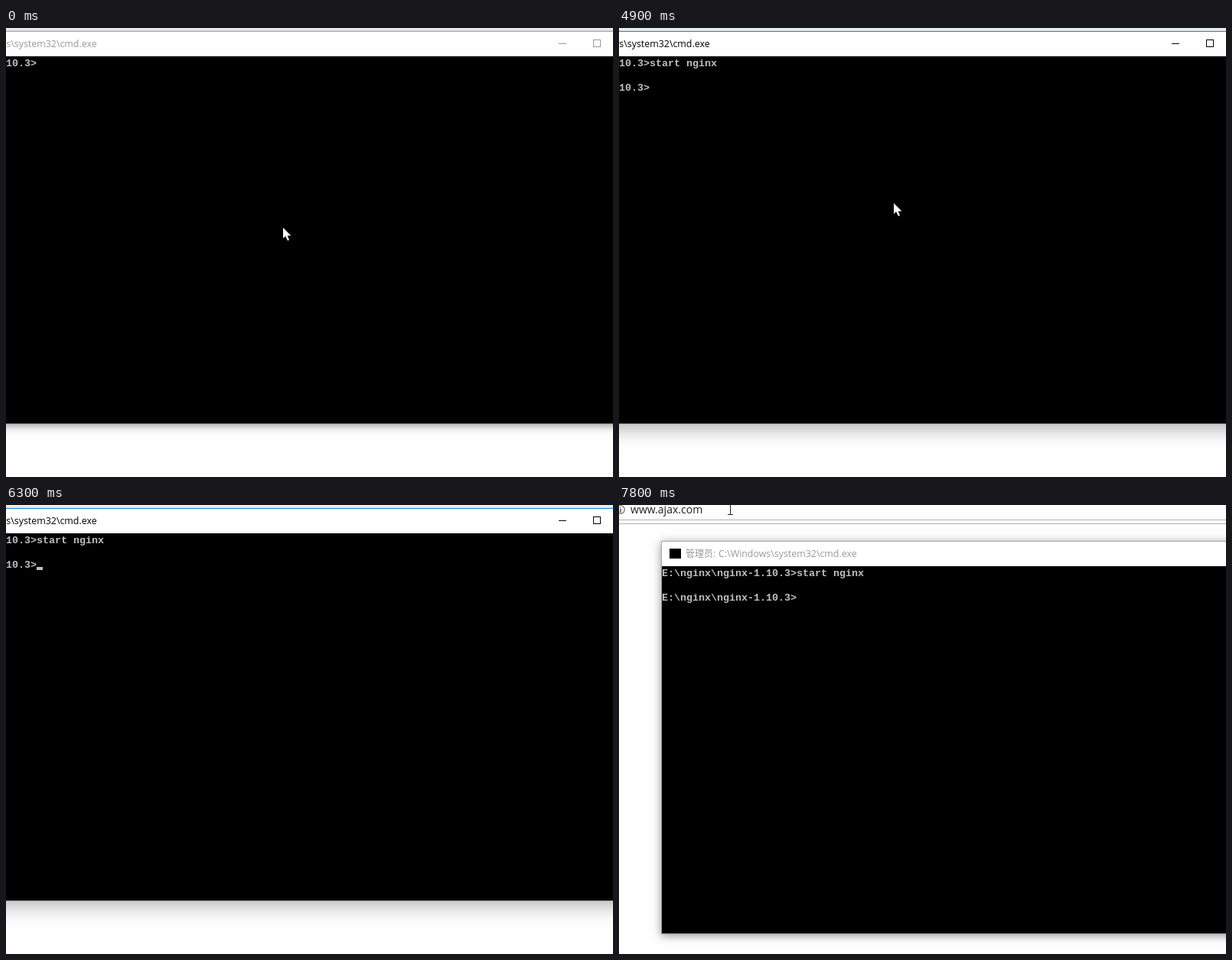
An HTML page with a canvas for the animation above (8 s loop, 793 by 587 pixels).

```html
<!DOCTYPE html>
<html lang="en">
<head>
<meta charset="utf-8">
<style>
html, body { margin: 0; width: 100%; height: 100%; overflow: hidden; background: #fefefe; }
canvas { display: block; }
</style>
</head>
<body>
<canvas id="stage" width="793" height="587"></canvas>
<script>
const ctx = document.getElementById('stage').getContext('2d');
const LOOP = 8000, STEP = 100;
const PROMPT = 'E:\\nginx\\nginx-1.10.3>', COMMAND = 'start nginx', CELL = 8;
const PAN = { x: 192, y: 43 };
const BLUE = '#1883d7', GRAY = '#c0c0c0';
// Moments of the story, in ms
const FOCUS = 100, TYPE = 1500, WORD2 = 4000, ENTER = 4900, LOADING = 5000, CHILD = 5100,
      BACK = 5400, LEAVE = 5800, BLUR = 6700, DRAG = 6900, PANNED = 7700;

const clamp = (v, lo, hi) => Math.min(hi, Math.max(lo, v));

function rect(color, x, y, w, h) {
  ctx.fillStyle = color;
  ctx.fillRect(x, y, w, h);
}

function text(str, x, y, color, font) {
  ctx.font = font;
  ctx.fillStyle = color;
  ctx.fillText(str, x, y);
}

function ring(x, y, r, width, color) {
  ctx.strokeStyle = color;
  ctx.lineWidth = width;
  ctx.beginPath();
  ctx.arc(x, y, r, 0, 7);
  ctx.stroke();
}

function shadowBox(color, x, y, w, h, active) {
  ctx.save();
  ctx.shadowColor = active ? 'rgba(0,0,0,.3)' : 'rgba(0,0,0,.42)';
  ctx.shadowBlur = active ? 24 : 11;
  ctx.shadowOffsetY = active ? 6 : 2;
  rect(color, x, y, w, h);
  ctx.restore();
}

function arrow(x, y) {
  ctx.save();
  ctx.translate(x, y);
  const shape = new Path2D('M0 0V14L3 11L6 17L8 16L5.6 10.4H10.4Z');
  ctx.lineWidth = 1.5;
  ctx.strokeStyle = '#000';
  ctx.stroke(shape);
  ctx.fillStyle = '#fff';
  ctx.fill(shape);
  ctx.restore();
}

function beam(x, y) {
  rect('#222', x, y - 7, 1, 14);
  for (const end of [y - 8, y + 6]) {
    rect('#222', x - 3, end, 3, 1);
    rect('#222', x + 1, end, 3, 1);
  }
}

function chevron(x, y, angle) {
  ctx.save();
  ctx.translate(x, y);
  ctx.rotate(angle);
  ctx.lineWidth = 2;
  ctx.strokeStyle = '#505050';
  ctx.stroke(new Path2D('M-3 -2L0 1.5L3 -2'));
  ctx.restore();
}

function browser() {
  rect('#b4b4b4', 0, 19, 1000, 6);
  rect('#f8f8f8', 0, 20, 1000, 4);
  ring(2, 6, 5.3, 1.3, '#777');
  rect('#777', 1, 3, 2, 1);
  rect('#777', 1, 5, 2, 5);
  text('www.ajax.com', 15, 11, '#222', '14px "Open Sans", sans-serif');
}

// The first word is typed slowly, the second one faster
function typedCount(time) {
  return time < WORD2
    ? clamp(Math.floor((time - TYPE) / 380) + 1, 0, 6)
    : Math.min(7 + Math.floor((time - WORD2) / 200), COMMAND.length);
}

// Blinking restarts with each new phase of input
function caretOn(time) {
  const since = time < TYPE ? FOCUS : time < LOADING ? TYPE : BACK - 100;
  return (time - since) % 950 < 475;
}

function terminal(time, active) {
  const ink = active ? '#000' : '#999';
  shadowBox(active ? BLUE : '#a6a6a6', 55, 47, 1000, 514, active);
  rect('#fff', 56, 48, 1000, 32);
  rect('#000', 56, 80, 1000, 480);
  rect('#999', 55, 560, 1000, 1);
  rect('#000', 66, 57, 15, 13);
  const font = '"Open Sans", "Noto Sans CJK SC", "Noto Sans CJK", sans-serif';
  text('管理员:', 87, 68, ink, '12px ' + font);
  text('C:\\Windows\\system32\\cmd.exe', 130, 68, ink, '12.4px ' + font);
  rect(ink, 914, 63, 10, 1);
  ctx.strokeStyle = ink;
  ctx.lineWidth = 1;
  ctx.strokeRect(959.5, 58.5, 9, 9);

  const typed = typedCount(time), entered = time >= ENTER;
  const lines = [PROMPT + COMMAND.slice(0, typed), ''];
  if (entered) lines.push(PROMPT);
  lines.forEach((str, i) => text(str, 56, 93 + 16 * i, GRAY, 'bold 13.33px "Liberation Mono", monospace'));
  if (active && caretOn(time))
    rect(GRAY, 232 + (entered ? 0 : typed * CELL), entered ? 124 : 92, CELL, 4);
}

function popup(edge, right, active) {
  shadowBox(edge, -40, -40, right + 41, 496, active);
  rect('#f0f0f0', -40, -40, right + 40, 495);
}

function loadingWindow() {
  popup(BLUE, 698, true);
  rect('#fefefe', 0, 0, 682, 439);
  rect('#cdcdcd', 682, 0, 15, 9);
  chevron(689.5, 430, 0);
  chevron(673, 447, -Math.PI / 2);
  for (let i = 0; i < 3; i++)
    for (let j = 0; j <= i; j++) rect('#b8b8b8', 693 - 3 * j, 445 + 3 * i, 2, 2);
  ring(358, 227, 7.8, 4.6, '#2a9df4');
}

function childConsole() {
  popup('#777', 715, true);
  rect('#000', 0, 0, 698, 455);
  rect('#cdcdcd', 699, 0, 15, 9);
  chevron(706.5, 447, 0);
}

// Inverted outline of the region being dragged
function dragOutline(time) {
  const u = clamp((time - DRAG + 50) / 350, 0, 1), p = u * (2 - u);
  const x = Math.round(797 - PAN.x * p), y = Math.round(623 - PAN.y * p);
  ctx.globalCompositeOperation = 'difference';
  rect('#fff', x, 0, 4, y + 4);
  rect('#fff', 0, y, x, 4);
  ctx.globalCompositeOperation = 'source-over';
}

function pointer(time) {
  if (time < FOCUS + STEP) arrow(362, 261);
  else if (time < BLUR) {
    const u = clamp((time - LEAVE + STEP) / 500, 0, 1), p = u * u * (3 - 2 * u);
    arrow(Math.round(359 - 94 * p), Math.round(229 - 249 * p));
  } else if (time >= PANNED) {
    const p = clamp((time - PANNED) / STEP, 0, 1);
    beam(160 - 15 * p, 10 - 4 * p);
  }
}

function draw(time) {
  const within = (from, to) => time >= from && time < to;
  rect('#fefefe', 0, 0, 793, 587);
  ctx.save();
  if (time < PANNED) ctx.translate(-PAN.x, -PAN.y);
  browser();
  terminal(time, within(FOCUS, LOADING) || within(BACK, BLUR));
  ctx.restore();
  if (within(LOADING, CHILD)) loadingWindow();
  else {
    if (within(CHILD, BACK)) childConsole();
    if (within(DRAG, PANNED)) dragOutline(time);
    pointer(time);
  }
}

const start = performance.now();
function tick() {
  const t = (performance.now() - start) % LOOP;
  draw(Math.floor(t / STEP) * STEP);
  requestAnimationFrame(tick);
}
tick();
</script>
</body>
</html>
```
